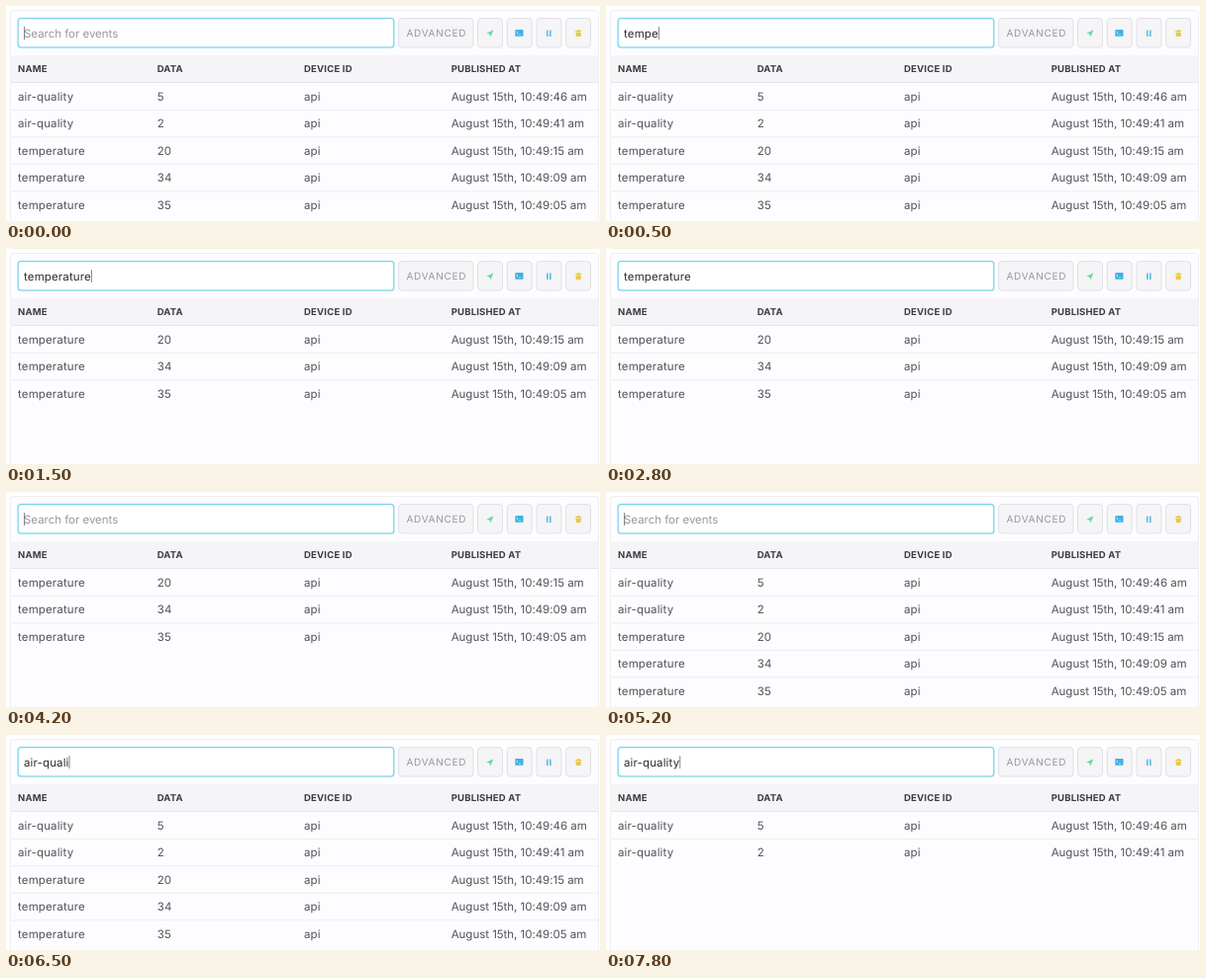
Write an HTML page that moves like this. It is 600x218 px and loops after 8 s.

```html
<!DOCTYPE html>
<html lang="en">
<head>
<meta charset="utf-8">
<title>Event search</title>
<style>
html, body { margin: 0; width: 100%; height: 100%; overflow: hidden; background: #fff; }
svg { display: block; width: 600px; height: 218px; }
text { font: 11.5px Inter, "Open Sans", sans-serif; fill: #525257; letter-spacing: .14px; text-rendering: geometricPrecision; white-space: pre; }
.head text { font-size: 9.5px; font-weight: 700; fill: #3c3c40; letter-spacing: .2px; }
.date { letter-spacing: -.03px; }
.button { fill: #f5f4f6; stroke: #e1e0e4; }
#advanced { font-size: 10px; fill: #98989d; letter-spacing: .7px; }
#hint { fill: #98989d; letter-spacing: -.03px; }
#query { fill: #2c2c30; }
</style>
</head>
<body>
<svg viewBox="0 0 600 218">
  <path d="M4.5 219V7.5a3 3 0 0 1 3-3H595.5a3 3 0 0 1 3 3V219" fill="#fdfcfe" stroke="#efeef1"/>
  <rect x="5" y="50" width="593" height="27.5" fill="#f5f4f6"/>
  <path d="M5 77.5H598" stroke="#e6e5e9"/>

  <rect x="12.2" y="12.5" width="379.6" height="29.5" rx="3" fill="#fff" stroke="#e0f5fb" stroke-width="2.4"/>
  <rect x="12.2" y="12.5" width="379.6" height="29.5" rx="3" fill="none" stroke="#7dd4ea" stroke-width="1.1"/>
  <rect id="selection" x="18" y="21" height="13" fill="#b3d6fc"/>
  <text id="hint" x="18" y="31.5">Search for events</text>
  <text id="query" x="18" y="31.5"></text>
  <rect id="caret" y="21" width="1" height="13" fill="#85858a"/>

  <g class="button">
    <rect x="396.5" y="12.5" width="75.5" height="29.5" rx="3.5"/>
    <rect x="476.5" y="12.5" width="25" height="29.5" rx="3.5"/>
    <rect x="506.2" y="12.5" width="25" height="29.5" rx="3.5"/>
    <rect x="535.9" y="12.5" width="25" height="29.5" rx="3.5"/>
    <rect x="565.6" y="12.5" width="25" height="29.5" rx="3.5"/>
  </g>
  <text id="advanced" x="404.5" y="31.3">ADVANCED</text>
  <path d="M492.3 24.3 485.4 27.8 488.5 28.4 489.4 31.4Z" fill="#6dd49d"/>
  <rect x="514.3" y="24" width="8.2" height="6.8" rx=".8" fill="#3db2e4"/>
  <path d="M515.6 25.6 517 27 515.6 28.4M517.8 28.9h2.4" fill="none" stroke="#dff2fb" stroke-width=".7"/>
  <path d="M546 24.5h1.6v6.6h-1.6zM549 24.5h1.6v6.6h-1.6z" fill="#5bbbe8"/>
  <path d="M575.1 25h1.9v-1h2.4v1h1.9v1h-6.2zM575.5 26.4h5.4l-.3 4.7h-4.8z" fill="#e9c847"/>

  <g class="head" id="head"></g>
  <g id="rows"></g>
</svg>
<script>
const $ = id => document.getElementById(id);
const columns = [12, 152.7, 301, 449.7];
const events = [
  ["air-quality", 5, "46"],
  ["air-quality", 2, "41"],
  ["temperature", 20, "15"],
  ["temperature", 34, "09"],
  ["temperature", 35, "05"]
];

const cells = (values, y) => values.map((value, i) =>
  `<text x="${columns[i]}" y="${y}"${i === 3 ? ' class="date"' : ""}>${value}</text>`).join("");

$("head").innerHTML = cells(["NAME", "DATA", "DEVICE ID", "PUBLISHED AT"], 67);

// Time of each key press
const words = [
  { text: "temperature", keys: [100, 200, 300, 400, 500, 700, 800, 1000, 1100, 1200, 1300], end: 4200 },
  { text: "air-quality", keys: [5400, 5500, 5600, 5900, 6000, 6100, 6300, 6400, 6500, 6600, 6800], end: 8000 }
];
const caretOff = [[1800, 2300], [2800, 3000], [3300, 3700], [3900, 4200], [4700, 5200], [7300, 7800]];
const within = (t, [from, to]) => t >= from && t < to;
const show = (id, on) => $(id).setAttribute("visibility", on ? "visible" : "hidden");

let shownFilter = null;
function showRows(filter) {
  if (filter === shownFilter) return;
  shownFilter = filter;
  $("rows").innerHTML = events.filter(e => e[0].includes(filter)).map(([name, data, sec], i) => {
    const line = i ? `<path d="M5 ${77.9 + 27.5 * i}H598" stroke="#eeecf0"/>` : "";
    return line + cells([name, data, "api", `August 15th, 10:49:${sec} am`], 95.8 + 27.5 * i);
  }).join("");
}

function draw() {
  const t = performance.now() % 8000;
  const { text, keys } = words.find(w => t < w.end);
  const query = text.slice(0, keys.filter(k => k <= t).length);
  $("query").textContent = query;
  const width = query ? $("query").getComputedTextLength() : 0;

  show("hint", !query);
  show("selection", within(t, [3900, 4200]));
  $("selection").setAttribute("width", width);
  show("caret", !caretOff.some(span => within(t, span)));
  $("caret").setAttribute("x", 18 + width);

  showRows(within(t, [1500, 4500]) ? "temperature" : t >= 7000 ? "air-quality" : "");
  requestAnimationFrame(draw);
}
draw();
</script>
</body>
</html>
```
